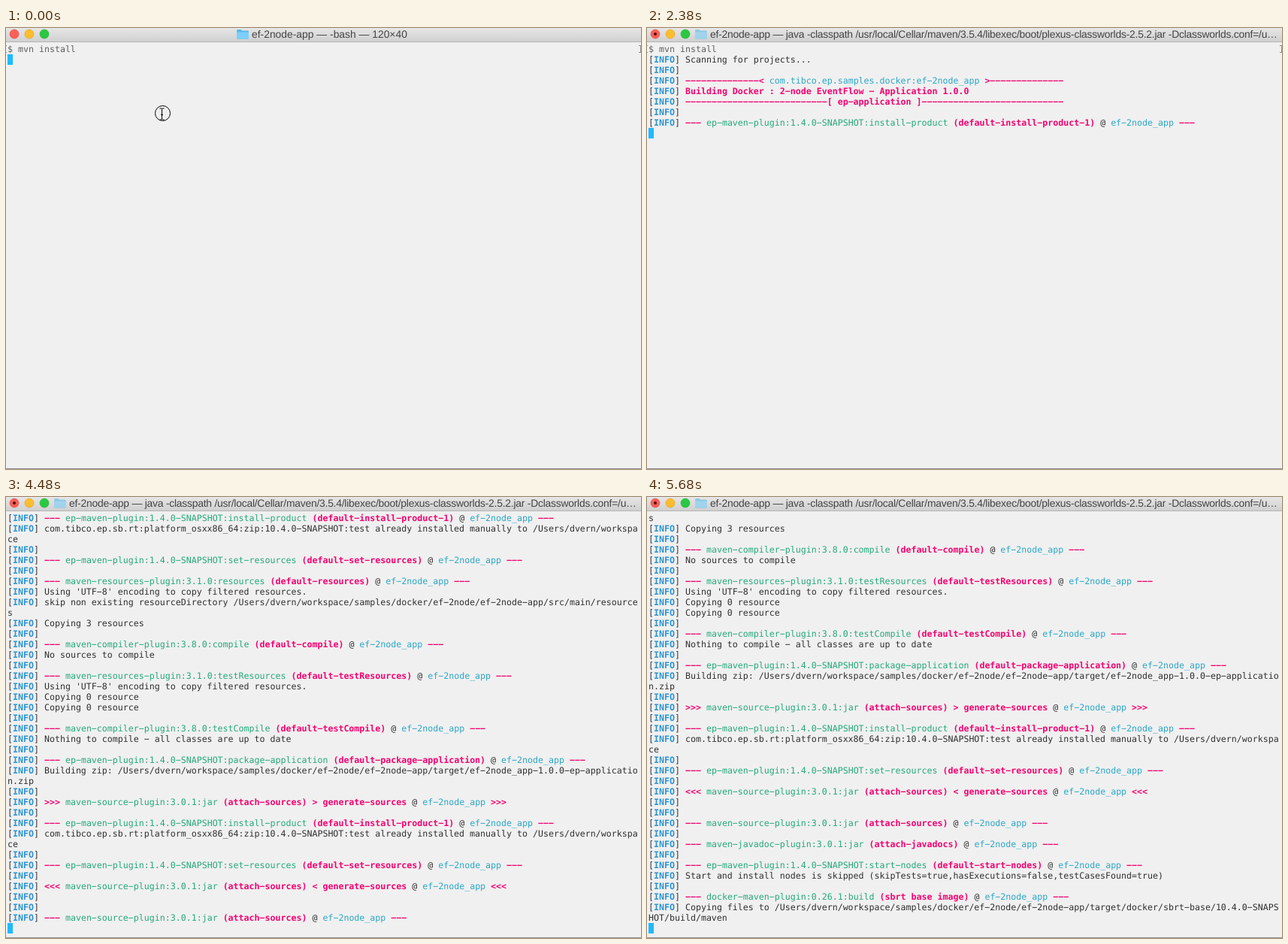
Recreate the animation shown at these times as an HTML page. Size 845x587 px, loop 8 s.

```html
<!DOCTYPE html>
<html lang="en">
<head>
<meta charset="utf-8">
<title>mvn install</title>
<style>
  html, body { margin: 0; width: 100%; height: 100%; overflow: hidden; background: #f0f0f0; }
  #stage { position: relative; width: 845px; height: 587px; overflow: hidden; background: #f0f0f0; text-rendering: geometricPrecision; }
  #stage > * { position: absolute; }
  .bar { left: 0; top: 0; width: 845px; height: 18px; background: linear-gradient(#e6e6e6, #d0d0d0); border-bottom: 1px solid #b6b6b6; }
  .title { top: 0; font: 13.86px/16px "Liberation Sans", Arial, sans-serif; color: #444; white-space: pre; }
  #idle { left: 327px; }
  #busy { left: 84px; letter-spacing: -.22px; }
  .floor { left: 0; top: 586px; width: 845px; height: 1px; background: #8f8f8f; }
  #screen { left: 0; top: 21px; width: 845px; height: 560px; overflow: hidden; font: 11.627px/14px "DejaVu Sans Mono", monospace; color: #303030; }
  #log { position: absolute; left: 2px; top: 0; white-space: pre; }
  #log div { height: 14px; }
  #log .prompt { color: #606060; }
  #caret { position: absolute; left: 2px; top: 0; width: 7px; height: 14px; background: #1fbaff; }
  .mark { position: absolute; top: 2px; height: 10px; box-sizing: border-box; border: 1px solid #8a8a8a; }
  .open { left: -2px; width: 3px; border-right: 0; }
  .close { left: 842px; width: 3px; border-left: 0; }
  i { font-style: normal; }
  b, .hot { font-weight: bold; }
  b { color: #2a94d2; }
  .hot { color: #f6006f; }
  .goal { color: #24a97b; }
  .name { color: #2aa7c7; }
  svg { left: 0; top: 0; }
</style>
</head>
<body>
<div id="stage">
  <div class="bar"></div>
  <div class="title" id="idle">ef-2node-app — -bash — 120×40</div>
  <div class="title" id="busy">ef-2node-app — java -classpath /usr/local/Cellar/maven/3.5.4/libexec/boot/plexus-classworlds-2.5.2.jar -Dclassworlds.conf=/u…</div>
  <div id="screen">
    <div id="log"></div>
    <div id="marks"><span class="mark open"></span><span class="mark close"></span></div>
    <div id="caret"></div>
  </div>
  <div class="floor"></div>
  <svg width="845" height="587">
    <g stroke-width=".6">
      <circle cx="11" cy="8" r="6" fill="#fd5e58" stroke="#e0463f"/>
      <circle cx="31" cy="8" r="6" fill="#fdbd2f" stroke="#dfa023"/>
      <circle cx="51" cy="8" r="6" fill="#29c841" stroke="#1dac2d"/>
    </g>
    <circle id="dot" cx="11" cy="8" r="2" fill="#520805"/>
    <g id="folder">
      <path d="M0 3.5q0-1.500 1.500-1.500h4l1.500 1.500h7.500q1.500 0 1.500 1.500v8q0 1.500-1.500 1.500h-13q-1.500 0-1.500-1.500z" fill="#58b8e8"/>
      <path d="M0 5.500h16v7.500q0 1.500-1.500 1.500h-13q-1.500 0-1.500-1.500z" fill="#7ccff8"/>
    </g>
    <g id="mouse" fill="none" stroke="#000">
      <circle r="10"/>
      <path d="M-4-6.500h2q1 0 1 1.500q0-1.500 1-1.500h2M-1-5v12M-4 8.500h2q1 0 1-1.500q0 1.500 1 1.500h2M-2.500 2h3"/>
    </g>
  </svg>
</div>
<script>
const LOOP = 8000, COLS = 120, ROWS = 40, LINE = 14;
const $ = id => document.getElementById(id);

const APP = 'ef-2node_app';
const WORK = '/Users/dvern/workspace';
const HOME = WORK + '/samples/docker/ef-2node/ef-2node-app';
const EP = 'ep-maven-plugin:1.4.0-SNAPSHOT:';
const lines = [];

const escape = s => s.replace(/&/g, '&amp;').replace(/</g, '&lt;').replace(/>/g, '&gt;');
// The minus glyph has the wide dash of the terminal face.
const dash = s => s.replace(/-/g, '\u2212');
const span = (kind, s) => `<i class="${kind}">${escape(dash(s))}</i>`;
const hot = s => span('hot', s);
const name = s => span('name', s);
const info = (html = '') => lines.push('[<b>INFO</b>] ' + html);

function say(text) {
  const room = COLS - 7;
  info(escape(dash(text.slice(0, room))));
  if (text.length > room) lines.push(escape(dash(text.slice(room))));
}

function goal(plugin, run, arrow = '---', phase = '') {
  info();
  info(`${hot(arrow)} ${span('goal', plugin)} ${hot(`(${run})${phase}`)} @ ${name(APP)} ${hot(arrow)}`);
}

function installProduct() {
  goal(EP + 'install-product', 'default-install-product-1');
  say('com.tibco.ep.sb.rt:platform_osxx86_64:zip:10.4.0-SNAPSHOT:test already installed manually to ' + WORK);
  goal(EP + 'set-resources', 'default-set-resources');
}

const encoding = "Using 'UTF-8' encoding to copy filtered resources.";
const jar = 'maven-source-plugin:3.0.1:jar';

lines.push('<i class="prompt">$ mvn install</i>');
say('Scanning for projects...');
info();
info(`${hot('-'.repeat(14) + '<')} ${name('com.tibco.ep.samples.docker:' + APP)} ${hot('>' + '-'.repeat(14))}`);
info(hot('Building Docker : 2-node EventFlow - Application 1.0.0'));
info(hot('-'.repeat(27) + '[ ep-application ]' + '-'.repeat(27)));
installProduct();
goal('maven-resources-plugin:3.1.0:resources', 'default-resources');
say(encoding);
say(`skip non existing resourceDirectory ${HOME}/src/main/resources`);
say('Copying 3 resources');
goal('maven-compiler-plugin:3.8.0:compile', 'default-compile');
say('No sources to compile');
goal('maven-resources-plugin:3.1.0:testResources', 'default-testResources');
say(encoding);
say('Copying 0 resource');
say('Copying 0 resource');
goal('maven-compiler-plugin:3.8.0:testCompile', 'default-testCompile');
say('Nothing to compile - all classes are up to date');
goal(EP + 'package-application', 'default-package-application');
say(`Building zip: ${HOME}/target/${APP}-1.0.0-ep-application.zip`);
goal(jar, 'attach-sources', '>>>', ' > generate-sources');
installProduct();
goal(jar, 'attach-sources', '<<<', ' < generate-sources');
info();
goal(jar, 'attach-sources');
goal('maven-javadoc-plugin:3.0.1:jar', 'attach-javadocs');
goal(EP + 'start-nodes', 'default-start-nodes');
say('Start and install nodes is skipped (skipTests=true,hasExecutions=false,testCasesFound=true)');
goal('docker-maven-plugin:0.26.1:build', 'sbrt base image');
say(`Copying files to ${HOME}/target/docker/sbrt-base/10.4.0-SNAPSHOT/build/maven`);

$('log').innerHTML = lines.map(s => `<div>${s}</div>`).join('');
const rows = [...$('log').children];

// [time, number of printed lines]
const output = [[0, 1], [890, 2], [1930, 6], [2380, 8], [3730, 20], [3880, 31],
  [4330, 33], [4480, 46], [4630, 48], [4780, 53], [5680, 55]];
// [time, x, y]
const pointer = [[0, 208.5, 113.5], [1040, 277.5, 132.5], [1190, 729.5, 166.5], [1330]];

const at = (steps, t) => steps.filter(s => s[0] <= t).pop();
const show = (el, on) => { el.style.visibility = on ? 'visible' : 'hidden'; };

function draw(t) {
  const busy = t >= 140;
  show($('idle'), !busy);
  show($('busy'), busy);
  show($('dot'), busy);
  $('folder').setAttribute('transform', `translate(${busy ? 64 : 307} 0)`);
  $('folder').setAttribute('opacity', busy ? .6 : 1);

  const count = at(output, t)[1];
  const top = Math.max(0, count - ROWS + 1);
  rows.forEach((row, i) => show(row, i < count));
  $('log').style.top = -top * LINE + 'px';
  $('caret').style.top = (count - top) * LINE + 'px';
  show($('marks'), top === 0);

  const [, x, y] = at(pointer, t);
  show($('mouse'), x !== undefined);
  if (x !== undefined) $('mouse').setAttribute('transform', `translate(${x} ${y})`);
}

const start = performance.now();
function tick() {
  draw((performance.now() - start) % LOOP);
  requestAnimationFrame(tick);
}
tick();
</script>
</body>
</html>
```
